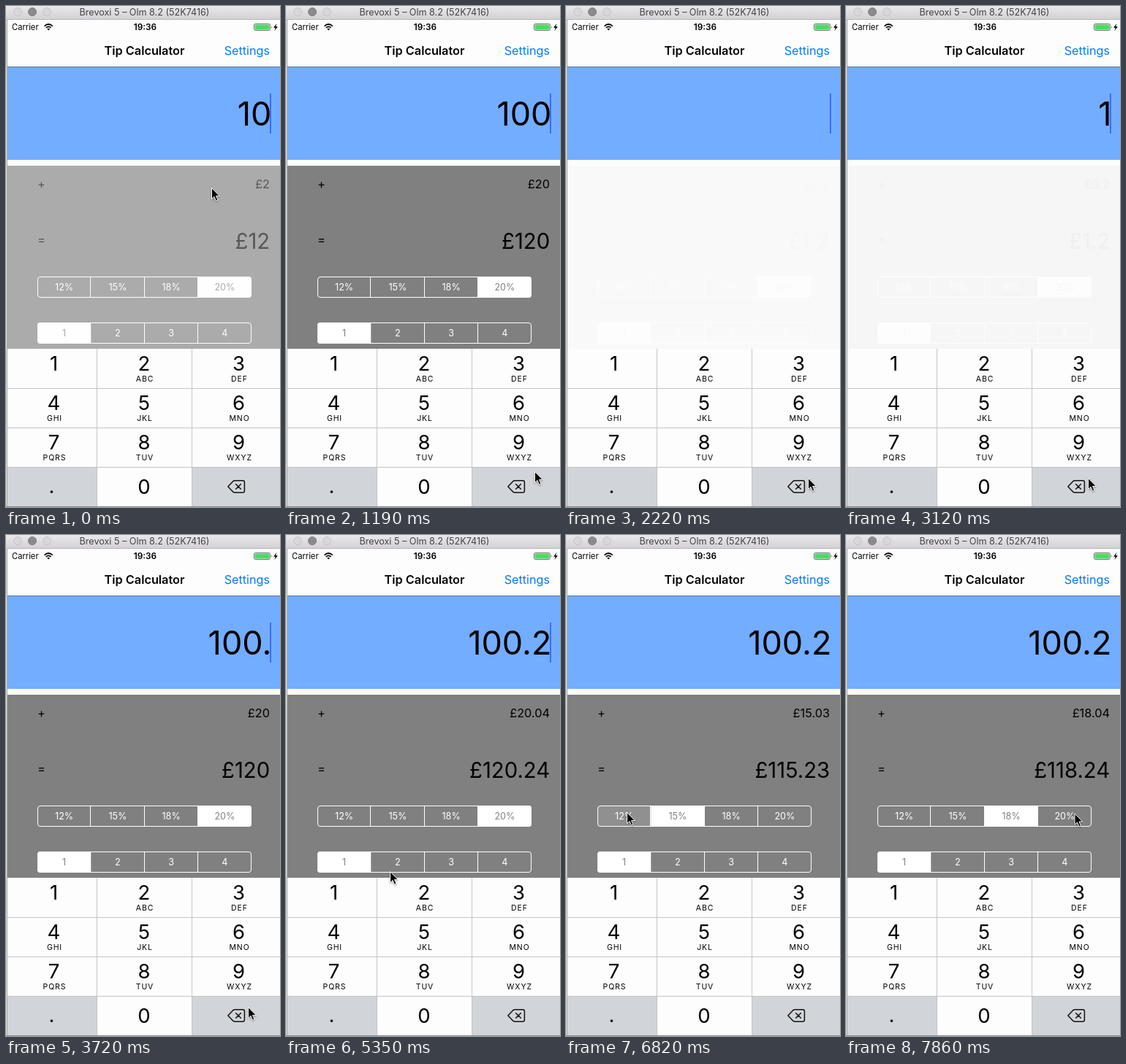
Recreate the animation shown at these times as an HTML page. Size 375 by 687 pixels, loop 8 s.

```html
<!DOCTYPE html>
<html lang="en">
<head>
<meta charset="utf-8">
<title>Tip Calculator</title>
<style>
html, body { margin: 0; width: 100%; height: 100%; overflow: hidden; background: #fdfdfd; }
svg { display: block; width: 375px; height: 687px; font-family: Inter, Roboto, sans-serif; }
.mid { text-anchor: middle; }
.end { text-anchor: end; }
.digit { font-size: 27.5px; }
.letters { font-size: 10.5px; letter-spacing: .9px; }
.seg text { font-size: 12.6px; text-anchor: middle; }
</style>
</head>
<body>
<svg viewBox="0 0 375 687">
  <defs>
    <linearGradient id="bar" x2="0" y2="1">
      <stop stop-color="#ebe8ec"/><stop offset="1" stop-color="#d4d1d5"/>
    </linearGradient>
    <clipPath id="round"><rect width="293" height="29" rx="4"/></clipPath>
  </defs>

  <!-- window title bar -->
  <rect width="375" height="18" fill="url(#bar)"/>
  <rect y="18" width="375" height="1" fill="#b8b6b9"/>
  <g fill="#dad7db" stroke="#c6c3c7">
    <circle cx="16" cy="8" r="5.5"/>
    <circle cx="36" cy="8" r="5.5" fill="#8b898c" stroke="#807e81"/>
    <circle cx="56" cy="8" r="5.5"/>
  </g>
  <text class="mid" x="189.5" y="13" font-size="12.6" fill="#454346">Brevoxi 5 – Olm 8.2 (52K7416)</text>

  <!-- status and navigation bars -->
  <text x="8" y="33" font-size="11.2">Carrier</text>
  <g fill="none" stroke="#000" stroke-width="1.7">
    <path d="M52.6 27.6Q58.2 22.4 63.8 27.6M54.8 29.9Q58.2 26.8 61.6 29.9"/>
    <path d="M58.2 33.6L56.3 31.6Q58.2 30 60.1 31.6Z" fill="#000" stroke="none"/>
  </g>
  <text class="mid" x="190.5" y="33" font-size="11.8" font-weight="600">19:36</text>
  <rect x="339.5" y="24.5" width="22" height="9" rx="1.8" fill="none" stroke="#555" stroke-width=".8"/>
  <rect x="340.5" y="25.5" width="20" height="7" rx=".8" fill="#4cd964"/>
  <path d="M363 27.3q1.6 1.7 0 3.4z" fill="#333"/>
  <path d="M370.5 24L366 29.8H368.8L367.4 34L372 28.2H369.2Z"/>
  <text class="mid" x="189.5" y="67" font-size="16.3" font-weight="600">Tip Calculator</text>
  <text class="end" x="361" y="67" font-size="16.2" fill="#007aff">Settings</text>

  <!-- bill entry -->
  <rect y="83" width="375" height="128" fill="#73adff"/>
  <rect y="83" width="375" height="1" fill="#59749b"/>
  <text id="bill" class="end" x="363.5" y="164" font-size="45"></text>
  <rect id="caret" x="361" y="120" width="2" height="55" fill="#426bf2"/>

  <!-- results -->
  <g id="results">
    <rect y="219" width="375" height="251" fill="#808080"/>
    <text x="43" y="250" font-size="16.5">+</text>
    <text x="43" y="326" font-size="16.5">=</text>
    <text id="tip" class="end" x="361" y="250" font-size="16.3"></text>
    <text id="total" class="end" x="361.2" y="333" font-size="29.3"></text>
    <g id="rates" class="seg" transform="translate(43 371)"></g>
    <g id="people" class="seg" transform="translate(43 434)"></g>
  </g>

  <g id="keys"></g>
  <path d="M303.8 659L311 651.6Q312 650.7 313.4 650.7H324Q326.4 650.7 326.4 653V665Q326.4 667.3 324 667.3H313.4Q312 667.3 311 666.4ZM314.2 655.2L321.8 662.8M321.8 655.2L314.2 662.8"
    fill="none" stroke="#111" stroke-width="1.5" stroke-linejoin="round"/>

  <!-- window edges -->
  <rect y="19" width="1" height="668" fill="#dedede"/>
  <rect x="1" y="19" width="1" height="668" fill="#a9a9a9"/>
  <rect y="686" width="375" height="1" fill="#8c8c8c"/>

  <path id="pointer" d="M0 0V15.2L3.5 12L6 17.8L8.5 16.7L6 11.1H10.8Z" stroke="#fff"
    style="filter:drop-shadow(0 1px 1px #0006)"/>
</svg>

<script>
const LOOP = 8000, BEAT = 148; // the screen refreshes once per beat
const KEY_GRAY = '#d1d4d9', KEY_WHITE = '#fdfdfd';
const rates = [12, 15, 18, 20];

// Segment taps and the pointer's way points, in beats.
const taps = [
  { beat: 0, seg: 3 }, { beat: 42, seg: 1 }, { beat: 47, seg: 0 }, { beat: 51, seg: 2 }
];
const stops = [
  [7, 281.5, 249.5], [8, 340.5, 638.5], [9, 331.5, 647.5], [33, 331.5, 647.5], [36, 142.5, 461.5],
  [39, 126, 384], [44, 132, 384], [46, 83.5, 380.5], [48, 88, 381], [50, 214, 384], [51, 220, 384], [53, 313, 382]
];

const $ = id => document.getElementById(id);
const set = (el, name, value) => el.setAttribute(name, value);
const clamp = (v, lo, hi) => Math.min(hi, Math.max(lo, v));
const ease = v => { const k = clamp(v, 0, 1); return k * k * (3 - 2 * k); };
const money = n => '£' + +(n + 1e-9).toFixed(2);

// Finish typing 100, delete it, then type 100.2 with pauses before the last two keys.
function billAt(b) {
  if (b < 10) return '100'.slice(0, b + 2);
  if (b < 21) return '100'.slice(0, Math.max(0, 2 - Math.floor((b - 10) / 2)));
  return '100.2'.slice(0, Math.min(b - 20, 3) + clamp(Math.floor((b - 23) / 2), 0, 2));
}

// The blink restarts at each keystroke.
function caretAt(b) {
  let key = b;
  while (key > 0 && billAt(key) === billAt(key - 1)) key--;
  return (b - key) % 7 < 4;
}

function fadeAt(b) {
  const out = ease((Math.min(b, 15) - 13) / 2.2); // stops just short of invisible
  return Math.min(1, ease((b + 1.2) / 2) - out + ease((b - 20.8) / 2));
}

function pointerAt(b) {
  const next = stops.findIndex(s => s[0] > b);
  if (next < 0) return stops.at(-1).slice(1);
  const [t1, x1, y1] = stops[next], [t0, x0, y0] = stops[Math.max(0, next - 1)];
  const k = ease((b - t0) / (t1 - t0 || 1));
  return [x0 + (x1 - x0) * k, y0 + (y1 - y0) * k];
}

function segments(id, labels) {
  const w = 293 / labels.length;
  const cells = labels.map((label, i) => `<rect x="${i * w}" width="${w}" height="29" fill="#fff"/>
    <text x="${(i + .5) * w}" y="19">${label}</text>`).join('');
  const lines = labels.slice(1).map((_, i) =>
    `<rect x="${Math.round((i + 1) * w) - 1}" width="1" height="29" fill="#fff"/>`).join('');
  $(id).innerHTML = `<g clip-path="url(#round)">${cells}${lines}</g>
    <rect x=".5" y=".5" width="292" height="28" rx="3.5" fill="none" stroke="#fff"/>`;
}

function select(id, chosen, touched) {
  $(id).querySelectorAll('text').forEach((label, i) => {
    set(label, 'fill', i === chosen ? '#808080' : '#fff');
    set(label.previousElementSibling, 'fill-opacity', i === chosen ? 1 : i === touched ? .12 : 0);
  });
}

function keypad() {
  const letters = ['', 'ABC', 'DEF', 'GHI', 'JKL', 'MNO', 'PQRS', 'TUV', 'WXYZ'];
  const centers = [65.5, 189, 318.5];
  let out = `<rect y="470" width="375" height="217" fill="${KEY_WHITE}"/>
    <rect y="632" width="124" height="55" fill="${KEY_GRAY}"/>
    <rect id="erase" x="255" y="632" width="120" height="55"/>
    <path d="M124.5 470V687M254.5 470V687M0 524.5H375M0 578.5H375M0 632.5H375" stroke="#c3c5ca"/>
    <text class="mid digit" x="189" y="669">0</text>
    <text class="mid digit" x="62.5" y="668">.</text>`;
  letters.forEach((word, i) => {
    const x = centers[i % 3], y = 500 + 54 * Math.floor(i / 3);
    out += `<text class="mid digit" x="${x}" y="${y}">${i + 1}</text>
      <text class="mid letters" x="${x + 1}" y="${y + 15}">${word}</text>`;
  });
  $('keys').innerHTML = out;
}

function draw(b) {
  const bill = billAt(b);
  const choice = taps.findLast(tap => tap.beat <= b).seg;
  const touched = taps.find(tap => tap.beat === b + 1)?.seg;
  const amount = +bill || 1, tip = amount * rates[choice] / 100;
  $('bill').textContent = bill;
  $('tip').textContent = money(tip);
  $('total').textContent = money(amount + tip);
  set($('results'), 'opacity', fadeAt(b));
  set($('caret'), 'opacity', +caretAt(b));
  set($('erase'), 'fill', b >= 10 && b <= 14 && b % 2 === 0 ? KEY_WHITE : KEY_GRAY);
  set($('pointer'), 'transform', `translate(${pointerAt(b)})`);
  select('rates', choice, touched);
}

segments('rates', rates.map(r => r + '%'));
segments('people', [1, 2, 3, 4]);
select('people', 0);
keypad();

const start = performance.now();
function tick() {
  draw(Math.min(53, Math.floor((performance.now() - start) % LOOP / BEAT)));
  requestAnimationFrame(tick);
}
tick();
</script>
</body>
</html>
```
